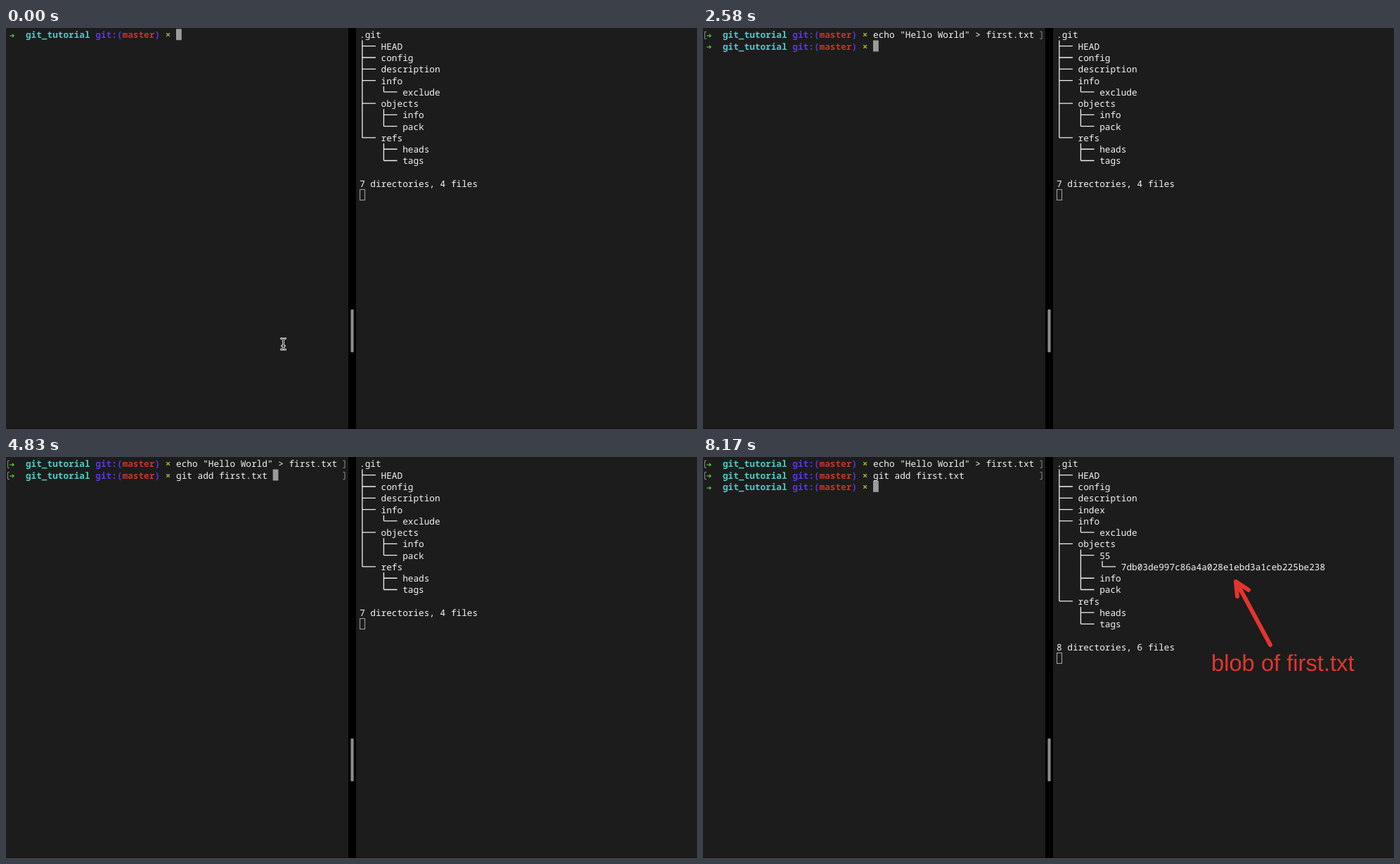
An HTML page for the animation above (8.25 s loop, 983x570 px).

```html
<!DOCTYPE html>
<html lang="en">
<head>
<meta charset="utf-8">
<title>git add</title>
<style>
  html, body { margin: 0; width: 100%; height: 100%; overflow: hidden; background: #1c1c1c; }
  svg { display: block; }
  text {
    font: 500 12.74px "Noto Sans Mono", "DejaVu Sans Mono", monospace;
    fill: #f6f6f6; white-space: pre; text-rendering: geometricPrecision;
  }
  .prompt { font-weight: 700; }
  .arrow { font: 9.5px "DejaVu Sans", sans-serif; fill: #57c936; }
  .dir { fill: #4fcaca; }
  .git { fill: #5a35e6; }
  .branch { fill: #c5352b; }
  .dirty { fill: #adb034; }
  .lines { fill: none; stroke: #f0f0f0; stroke-width: 1.3; }
  .mark { fill: none; stroke: #8c8c8c; stroke-width: 1; }
  .note text { font: 32.7px "Liberation Sans", Arial, sans-serif; fill: #e3342f; }
  .note path { fill: none; stroke: #e3342f; stroke-width: 6; stroke-linecap: round; stroke-linejoin: round; }
</style>
</head>
<body>
<svg width="983" height="570" viewBox="0 0 983 570">
  <defs>
    <path id="beam" d="M391.5 441.5Q394.5 441.5 394.5 444Q394.5 441.5 397.5 441.5M394.5 444V454.5M391.5 457Q394.5 457 394.5 454.5Q394.5 457 397.5 457M392.5 452H396.5"/>
  </defs>
  <rect width="983" height="570" fill="#1c1c1c"/>
  <rect y="569" width="983" height="1" fill="#111"/>
  <rect x="487" width="11" height="570" fill="#000"/>
  <rect x="490.4" y="400" width="4.2" height="61" rx="1.5" fill="#8b8b8b"/>
  <rect id="paste" x="242" y="1.3" width="229.4" height="16" fill="#fff"/>
  <rect id="cursor" width="7.8" height="15.9" fill="#9b9b9b"/>
  <g id="screen"></g>
  <g id="note" class="note">
    <path d="M807 267L760 180M760 198L758 177L776 189"/>
    <text x="723" y="304">blob of first.txt</text>
  </g>
  <g id="mouse" fill="none" stroke-linecap="round">
    <use href="#beam" stroke="#f4f4f4" stroke-width="2.8"/>
    <use href="#beam" stroke="#111" stroke-width="1"/>
  </g>
</svg>
<script>
(() => {
  const LOOP = 8250, CELL = 7.645, ROW = 16.28, LEFT = 5, RIGHT = 503;
  const START = 31; // first column after the prompt
  const $ = id => document.getElementById(id);
  const screen = $('screen');
  const rowTop = r => 1.3 + r * ROW;
  const baseline = r => 14.4 + r * ROW;

  function add(parent, tag, attrs, content = '') {
    const el = document.createElementNS('http://www.w3.org/2000/svg', tag);
    for (const k in attrs) el.setAttribute(k, attrs[k]);
    el.textContent = content;
    return parent.appendChild(el);
  }

  function write(parent, left, col, row, str, cls = '') {
    return add(parent, 'text', { x: left + col * CELL, y: baseline(row), class: cls }, str);
  }

  function addPrompt(row) {
    const g = add(screen, 'g', {});
    add(g, 'text', { x: 4.6, y: baseline(row) - 0.4, class: 'arrow' }, '➜');
    write(g, LEFT, 3, row, 'git_tutorial', 'prompt dir');
    write(g, LEFT, 16, row, 'git:(', 'prompt git');
    write(g, LEFT, 21, row, 'master', 'prompt branch');
    write(g, LEFT, 27, row, ')', 'prompt git');
    write(g, LEFT, 29, row, '×', 'prompt dirty');
    return g;
  }

  function addMark(row) {
    const y = rowTop(row) + 4;
    return add(screen, 'path', { class: 'mark', d: `M5 ${y}H2.5v10H5M479.5 ${y}h2.5v10h-2.5` });
  }

  // Box-drawing characters become strokes, everything else text.
  function addListing(rows) {
    const g = add(screen, 'g', {});
    const half = ROW / 2;
    let d = '';
    rows.forEach((line, r) => {
      const y = rowTop(r) + half;
      [...line].forEach((c, i) => {
        const x = RIGHT + i * CELL, mid = x + CELL / 2;
        if ('│├'.includes(c)) d += `M${mid} ${y - half}v${ROW}`;
        if (c === '└') d += `M${mid} ${y - half}v${half}`;
        if ('├└'.includes(c)) d += `M${mid} ${y}H${x + CELL}`;
        if (c === '─') d += `M${x} ${y}h${CELL}`;
      });
      const col = line.search(/[^│├└─ ]/);
      if (col >= 0) write(g, RIGHT, col, r, line.slice(col));
    });
    add(g, 'path', { class: 'lines', d });
    add(g, 'rect', {
      x: RIGHT + 0.5, y: rowTop(rows.length) + 0.4, width: 7, height: 15,
      fill: 'none', stroke: '#a5a5a5'
    });
    return g;
  }

  const before = addListing([
    '.git', '├── HEAD', '├── config', '├── description', '├── info',
    '│   └── exclude', '├── objects', '│   ├── info', '│   └── pack',
    '└── refs', '    ├── heads', '    └── tags', '', '7 directories, 4 files'
  ]);
  const after = addListing([
    '.git', '├── HEAD', '├── config', '├── description', '├── index', '├── info',
    '│   └── exclude', '├── objects', '│   ├── 55',
    '│   │   └── 7db03de997c86a4a028e1ebd3a1ceb225be238',
    '│   ├── info', '│   └── pack', '└── refs', '    ├── heads', '    └── tags',
    '', '8 directories, 6 files'
  ]);

  const prompts = [0, 1, 2].map(addPrompt);
  const marks = [0, 1].map(addMark);
  const echo = write(screen, LEFT, START, 0, 'echo "Hello World" > first.txt');
  const typed = write(screen, LEFT, START, 1, '');

  const command = 'git add first.txt ';
  const keys = [3000, 3170, 3330, 3670, 3750, 3880, 4040, 4210, 4370];
  const PASTE = 1000, ENTER = 2250, READY = 2340, TAB = 4540, RUN = 6000, DONE = 6090;
  const TREE = 6420, NOTE = 6500;

  const show = (el, on) => { el.style.visibility = on ? 'visible' : 'hidden'; };

  function cursorAt(t, length) {
    if (t < PASTE) return [START, 0];
    if (t < ENTER) return [START + 30, 0];
    if (t < READY) return [0, 1];
    if (t < RUN) return [START + length, 1];
    return [t < DONE ? 0 : START, 2];
  }

  function draw(t) {
    const length = t < TAB ? keys.filter(k => t >= k).length : command.length;
    const selected = t >= PASTE && t < ENTER;
    const [col, row] = cursorAt(t, length);

    show($('mouse'), t < PASTE);
    show($('paste'), selected);
    show(echo, t >= PASTE);
    echo.style.fill = selected ? '#111' : '';
    typed.textContent = command.slice(0, length);

    show(prompts[1], t >= READY);
    show(prompts[2], t >= DONE);
    show(marks[0], t >= ENTER);
    show(marks[1], t >= TAB);

    show(before, t < TREE);
    show(after, t >= TREE);
    show($('note'), t >= NOTE);

    $('cursor').setAttribute('x', LEFT + col * CELL);
    $('cursor').setAttribute('y', rowTop(row));
  }

  const began = performance.now();
  function tick() {
    draw((performance.now() - began) % LOOP);
    requestAnimationFrame(tick);
  }
  tick();
})();
</script>
</body>
</html>
```
